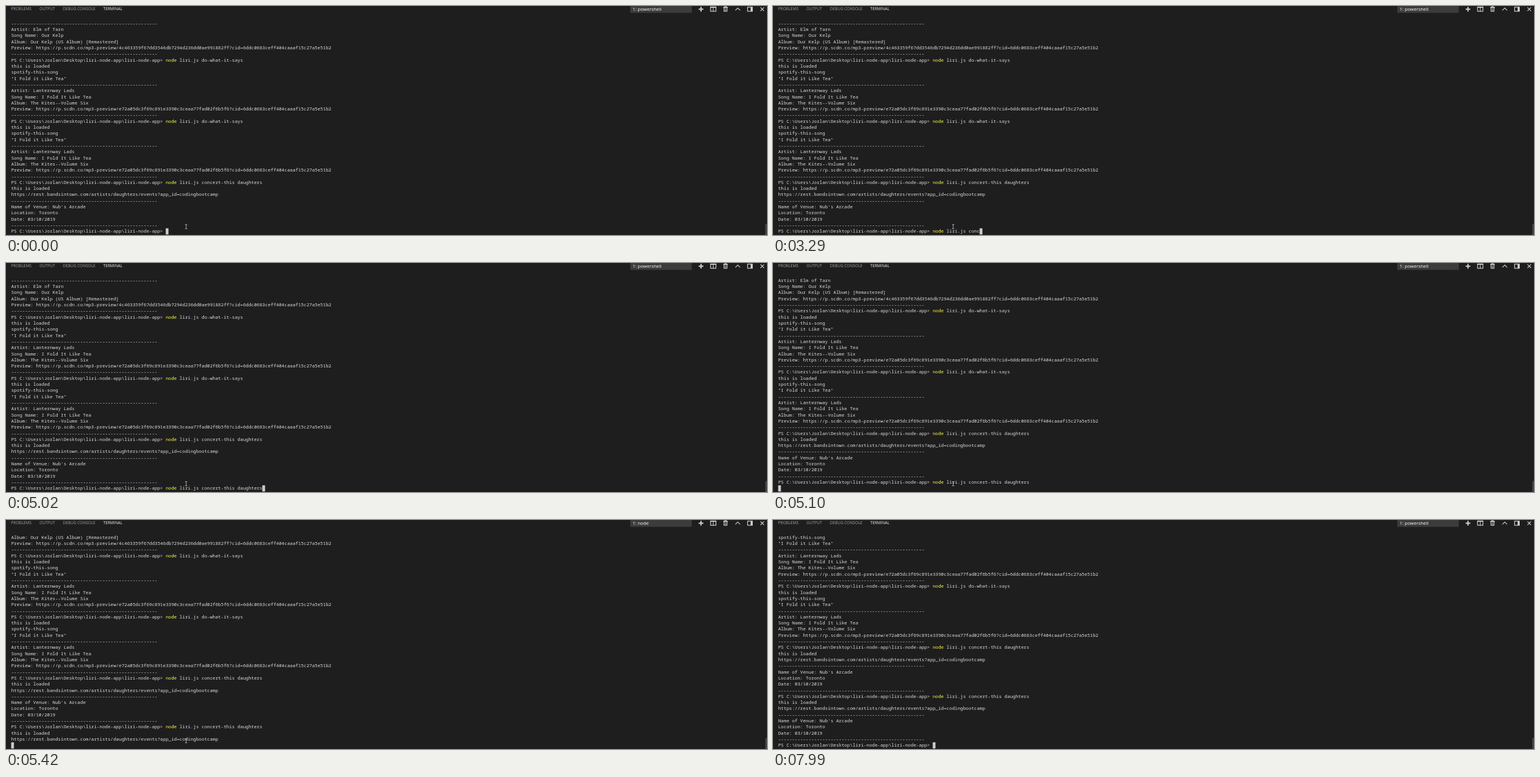
An HTML page with a canvas for the animation above (8790 ms loop, 1280 by 386 pixels).

```html
<!DOCTYPE html>
<html lang="en">
<head>
<meta charset="utf-8">
<title>Terminal</title>
<style>
  html, body { margin: 0; width: 100%; height: 100%; overflow: hidden; background: #1e1e1e; }
  canvas { display: block; }
</style>
</head>
<body>
<canvas id="stage" width="1280" height="386"></canvas>
<script>
const ctx = document.getElementById('stage').getContext('2d');
const LOOP = 8790;
const LEFT = 8.7, CELL = 4.642, ROW = 10.31, TOP = 24.2, BASELINE = 7.6, LAST_ROW = 34;
const MONO = '"Noto Sans Mono", monospace';
const SANS = '"Open Sans", sans-serif';
const BG = '#1e1e1e', FG = '#dcdcdc', YELLOW = '#ffff4a', CURSOR = '#cccccc', ICON = '#d0d0d0';

const PROMPT = 'PS C:\\Users\\Jorlan\\Desktop\\liri-node-app\\liri-node-app> ';
const RULE = '-'.repeat(53);

// Typing comes in bursts of evenly spaced keys: text, first key time, last key time
const bursts = [
  ['no', 410, 740], ['de lir', 890, 1360], ['i.js', 1770, 2160], [' ', 2710, 2710],
  ['concer', 3050, 3450], ['t-this', 3700, 4060], [' daught', 4310, 4710], ['ers', 4860, 5020]
];
const COMMAND = bursts.map(burst => burst[0]).join('');

const ENTER = 5100, NODE_STARTS = 5180, LOADED = 5250, REQUESTED = 5420, DONE = 5920;
const LEAVE = 7840, LEAVE_STEP = 75;

const song = (artist, name, album, id) => [
  RULE, 'Artist: ' + artist, 'Song Name: ' + name, 'Album: ' + album,
  `Preview: https://p.scdn.co/mp3-preview/${id}?cid=6ddc0683ceff404caaaf15c27a5e51b2`, RULE
];
const doIt = [
  PROMPT + 'node liri.js do-what-it-says', 'this is loaded', 'spotify-this-song', '"I Fold it Like Tea"',
  ...song('Lanternway Lads', 'I Fold It Like Tea', 'The Kites--Volume Six',
    'e72a05dc3f69c891e3390c3ceaa77fad02f6b5f6')
];
const concert = [
  PROMPT + COMMAND, 'this is loaded',
  'https://rest.bandsintown.com/artists/daughters/events?app_id=codingbootcamp',
  RULE, "Name of Venue: Nub's Arcade", 'Location: Toronto', 'Date: 03/10/2019', RULE
];
const before = [
  ...song('Elm of Tarn', 'Our Kelp', 'Our Kelp (US Album) [Remastered]',
    '4c463359f67dd3546db7294d236dd0ae991882ff'),
  ...doIt, ...doIt, ...concert
];

function typedText(t) {
  return bursts.map(([str, first, last]) => {
    if (t < first) return '';
    const gap = (last - first) / (str.length - 1) || 1;
    return str.slice(0, 1 + Math.floor((t - first) / gap + 1e-6));
  }).join('');
}

// Every line on record at time t; the last one holds the cursor
function history(t) {
  if (t < ENTER) return [...before, PROMPT + typedText(t)];
  if (t >= DONE) return [...before, ...concert, PROMPT];
  const printed = [ENTER, LOADED, REQUESTED].filter(time => time <= t).length;
  return [...before, ...concert.slice(0, printed), ''];
}

function rect(x, y, w, h, color) {
  ctx.fillStyle = color;
  ctx.fillRect(x, y, w, h);
}

// Laid out at 100px and scaled, so that advances stay fractional; returns the width
function text(str, x, y, size, font, color) {
  ctx.save();
  ctx.translate(x, y);
  ctx.scale(size / 100, size / 100);
  ctx.font = font.replace('"', '100px "');
  ctx.fillStyle = color;
  ctx.fillText(str, 0, 0);
  const width = ctx.measureText(str).width * size / 100;
  ctx.restore();
  return width;
}

function mono(str, col, row, color = FG) {
  text(str, LEFT + col * CELL, TOP + row * ROW + BASELINE, CELL / 0.6, '500 ' + MONO, color);
}

function terminalLine(str, row) {
  if (!str.startsWith(PROMPT)) return mono(str, 0, row);
  const input = str.slice(PROMPT.length);
  mono(PROMPT, 0, row);
  mono(input.slice(0, 4), PROMPT.length, row, YELLOW);
  mono(input.slice(4), PROMPT.length + 4, row);
}

function terminal(t) {
  const visible = history(t).slice(-LAST_ROW - 1);
  visible.forEach(terminalLine);
  rect(LEFT + visible[LAST_ROW].length * CELL, TOP + LAST_ROW * ROW, CELL, ROW, CURSOR);
  rect(1277, 367.5, 3, 18.5, '#434343');
}

const bar = (x, y, w, h) => ctx.fillRect(x, y, w, h);
const frame = (w, h) => ctx.strokeRect(-w / 2, -h / 2, w, h);
function line(x1, y1, x2, y2) {
  ctx.beginPath();
  ctx.moveTo(x1, y1);
  ctx.lineTo(x2, y2);
  ctx.stroke();
}

// Each icon is drawn around its own centre
const icons = [
  function add() { bar(-4, -1, 8, 2); bar(-1, -4, 2, 8); },
  function split() { frame(9, 7); bar(-5, -4, 10, 1.5); bar(-0.5, -4, 1, 8); },
  function trash() { frame(5, 7); bar(-4, -3.5, 8, 1.2); bar(-1.5, -5, 3, 1.2); bar(-0.5, -2, 1, 5); },
  function maximise() { line(-4, 2, 0.3, -2.3); line(-0.3, -2.3, 4, 2); },
  function side() { frame(8, 7); bar(1, -3.5, 3, 7); },
  function close() { line(-3, -3, 3, 3); line(-3, 3, 3, -3); }
];

function header(t) {
  let x = 8.5;
  for (const tab of ['PROBLEMS', 'OUTPUT', 'DEBUG CONSOLE', 'TERMINAL']) {
    x += 13.2 + text(tab, x, 7.4, 6.67, SANS, tab === 'TERMINAL' ? '#f4f4f4' : '#a4a4a4');
  }
  const shell = t >= NODE_STARTS && t < DONE ? 'node' : 'powershell';
  rect(1050, 0, 103.5, 11.5, '#3c3c3c');
  text('1: ' + shell, 1053.8, 8, 7.85, SANS, '#ffffff');
  ctx.beginPath();
  ctx.moveTo(1144.8, 3.2);
  ctx.lineTo(1149.2, 3.2);
  ctx.lineTo(1147, 6.8);
  ctx.fill();
  icons.forEach((icon, i) => {
    ctx.save();
    ctx.translate(1169 + i * 20.6, 5.4);
    ctx.fillStyle = ctx.strokeStyle = ICON;
    ctx.lineWidth = 1.2;
    icon();
    ctx.restore();
  });
}

// The pointer rests, then speeds away in two jumps
function pointer(t) {
  const jump = Math.max(0, Math.floor((t - LEAVE) / LEAVE_STEP) + 1);
  if (jump > 2) return;
  const p = (jump / 2) ** 2;
  ctx.save();
  ctx.translate(303 + 533 * p, 372 - 52.5 * p);
  ctx.fillStyle = CURSOR;
  bar(-0.4, -3.8, 0.8, 7.6);
  bar(-1.9, -4, 3.8, 0.7);
  bar(-1.9, 3.3, 3.8, 0.7);
  ctx.restore();
}

function draw(t) {
  rect(0, 0, 1280, 386, BG);
  header(t);
  terminal(t);
  pointer(t);
}

const start = performance.now();
function tick() {
  draw((performance.now() - start) % LOOP);
  requestAnimationFrame(tick);
}
tick();
</script>
</body>
</html>
```
